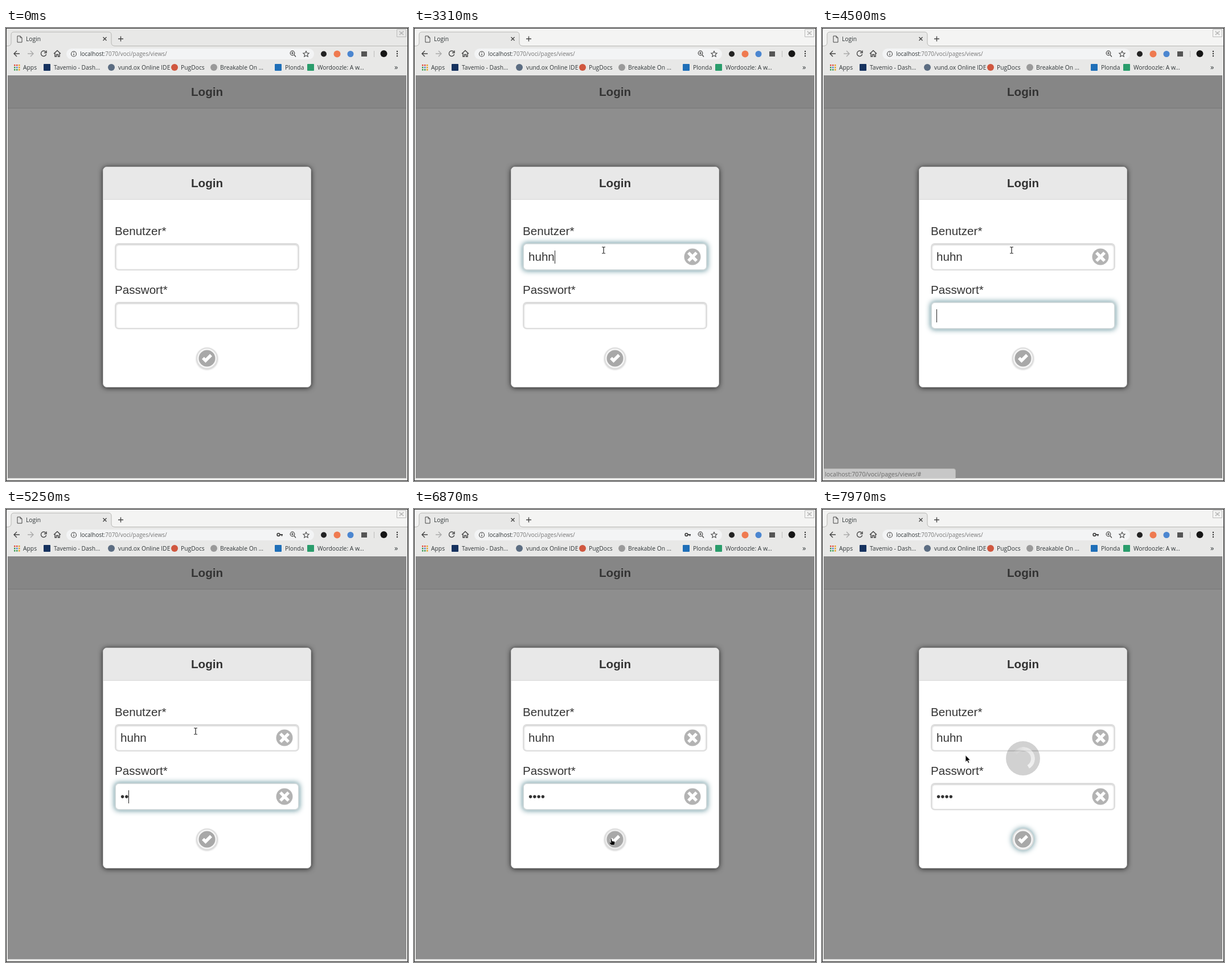
An HTML page that plays this animation: 706 by 794 pixels, repeating every 8 s.

```html
<!DOCTYPE html>
<html lang="de">
<head>
<meta charset="utf-8">
<title>Login</title>
<style>
html, body { margin: 0; width: 100%; height: 100%; overflow: hidden; background: #2b2b2b; }
body * { position: absolute; box-sizing: border-box; }
svg { left: 0; top: 0; overflow: visible; }
.ui { font: 10.3px "Open Sans", "Noto Sans", sans-serif; fill: #2e3436; }
.line { fill: none; stroke: #444; stroke-width: 1.4; }
#page, #page * { font: 20.6px/24px "Liberation Sans", Arial, sans-serif; color: #333; white-space: pre; }
#page h1 { margin: 0; width: 100%; text-align: center; font-weight: bold; }
#top { left: 3px; top: 83px; width: 700px; height: 58px; background: #868686; border-bottom: 1px solid #777; }
#dialog { left: 170px; top: 243px; width: 366px; height: 387px; background: #fff; border: 1px solid #ccc;
  border-radius: 7px; box-shadow: 0 1px 10px rgba(0,0,0,.75); }
#bar { left: 0; top: 0; width: 364px; height: 57px; background: #e8e8e8; border-bottom: 1px solid #d6d6d6; border-radius: 6px 6px 0 0; }
.field { left: 191px; width: 324px; height: 48px; background: #fff; border: 2px solid #ddd; border-radius: 7px;
  box-shadow: inset 0 1px 3px rgba(0,0,0,.25); }
.field span { left: 8px; top: 10px; }
.caret { top: 11px; width: 1px; height: 23px; background: #222; }
.btn { width: 38px; height: 38px; border-radius: 50%; border: 2px solid transparent; }
.btn svg { left: -2px; top: -2px; }
.clear { left: 469.5px; }
#ok { left: 334px; top: 559.5px; background: #f6f6f6; border-color: #ddd; box-shadow: 0 1px 3px rgba(0,0,0,.2); }
#ok.hover { background: #ededed; }
.clear.focus { background: #fff; border-color: #d4dcdd; }
.field.focus, .btn.focus, #ok.focus { box-shadow: 0 0 10px 1px #709ba4; }
.field.focus { border-color: #ccd6d8; }
#loader { left: 323px; top: 407px; width: 60px; height: 60px; border-radius: 50%; background: rgba(0,0,0,.18); }
#ring { left: 9.5px; top: 9.5px; width: 41px; height: 41px; border-radius: 50%;
  background: conic-gradient(transparent 40%, rgba(255,255,255,.45) 60%, rgba(255,255,255,.7) 99%, transparent);
  -webkit-mask: radial-gradient(circle, transparent 13px, #000 14px); mask: radial-gradient(circle, transparent 13px, #000 14px); }
</style>
</head>
<body>
<svg width="706" height="794" class="ui">
  <rect x="1" y="1" width="704" height="792" fill="#e8e8e7"/>
  <rect id="strip" x="1" y="1" width="704" height="31"/>
  <path d="M1 32H3Q9 31 9 26V12Q9 7 14 7H180Q185 7 185 12V26Q185 31 191 31.5H705V84H1Z" fill="#e8e8e7"/>
  <path d="M1 31.5H3Q9 31 9 26V12Q9 7 14 7H180Q185 7 185 12V26Q185 31 191 31.5H705" fill="none" stroke="#b6b6b3"/>
  <path d="M686.500 2.500h16v13h-16z" fill="none" stroke="#bbb"/>
  <path d="M691 6l7 6M698 6l-7 6" stroke="#aaa" stroke-width="2" stroke-dasharray="1.500 1"/>
  <g class="line">
    <path d="M20 14h5l3 3v8h-8zM25 14v3h3" stroke-width="1"/>
    <path d="M170.500 16l6 6m0-6l-6 6M197 19h9m-4.500-4.500v9"/>
    <path d="M24 45H14m5-5l-5 5 5 5"/>
    <path d="M38 45h10m-5-5l5 5-5 5" stroke="#aaa"/>
    <path d="M70 42a4.700 4.700 0 1 0 .7 4M71 39.500v4h-4"/>
    <path d="M84 45l6-5.500 6 5.500M86 44v6h2.500v-3.500h3v3.500h2.500v-6"/>
  </g>
  <rect x="106" y="36" width="435" height="19" rx="9.500" fill="#f3f4f5"/>
  <g class="line" stroke-width="1">
    <circle cx="119" cy="45.500" r="4.500" stroke-width="1.100"/>
    <path d="M119 45v3m0-5.500v1.300" stroke-width="1.200"/>
    <circle cx="503" cy="44" r="3.800" stroke-width="1.200"/>
    <path d="M506 47l3 3.500M501 44h4m-2-2v4" stroke-width="1.200"/>
    <path d="M527 40.500l1.500 3.300 3.600.4-2.700 2.400.8 3.600-3.200-1.900-3.200 1.900.8-3.600-2.700-2.400 3.600-.4z" stroke-width="1.100"/>
    <path d="M646.500 40v11" stroke="#bbb" stroke-width="1"/>
  </g>
  <g id="key" fill="none" stroke="#444" stroke-width="1.800">
    <circle cx="478.500" cy="45" r="2.300"/><path d="M481 45h5m-1.500 0v2.500"/>
  </g>
  <text x="35" y="22.500">Login</text>
  <text x="130" y="49" font-size="10" style="font-size:9.950px">localhost<tspan fill="#777">:7070/voci/pages/views/</tspan></text>
  <g fill="#333"><circle cx="687" cy="41" r="1.200"/><circle cx="687" cy="45" r="1.200"/><circle cx="687" cy="49" r="1.200"/></g>
  <circle cx="558" cy="45.500" r="5" fill="#222"/>
  <circle cx="581.500" cy="45.500" r="6" fill="#ef7a50"/>
  <circle cx="605" cy="45.500" r="5.500" fill="#4b86d0"/>
  <rect x="624" y="41" width="10" height="9" fill="#555"/>
  <circle cx="663.500" cy="45" r="6" fill="#151515"/>
  <g id="apps"></g>
  <g id="marks"></g>
  <text x="682" y="73" style="font-size:13px">»</text>
  <rect x="3" y="83" width="700" height="706" fill="#8e8e8e"/>
</svg>

<div id="page">
  <div id="top"><h1 style="top:17px">Login</h1></div>
  <div id="dialog"><div id="bar"><h1 style="top:16px">Login</h1></div></div>
  <span style="left:191px;top:344px">Benutzer*</span>
  <span style="left:191px;top:447px">Passwort*</span>
  <div class="field" style="top:377px"><span></span><i class="caret"></i></div>
  <div class="field" style="top:480px"><span></span><i class="caret"></i></div>
  <div class="btn clear" style="top:382px"></div>
  <div class="btn clear" style="top:485px"></div>
  <div class="btn" id="ok"></div>
  <div id="loader"><div id="ring"></div></div>
</div>

<svg width="706" height="794" class="ui">
  <g id="status">
    <path d="M3 772.500H231Q234.500 772.500 234.500 776V790H3Z" fill="#e8e8e7" stroke="#c4c4c2"/>
    <text x="5" y="786" fill="#555" style="font-size:10.600px">localhost:7070/voci/pages/views/#</text>
  </g>
  <g id="pointer">
    <path id="arrow" d="M0 0V12L2.800 9.500 4.800 14 6.800 13 4.900 8.800H8.500Z" fill="#000" stroke="#fff" stroke-width=".8"/>
    <path id="beam" d="M-3 -5.500H-1L0 -5 1 -5.500H3M0 -5V5M-3 5.500H-1L0 5 1 5.500H3" fill="none" stroke="#222" stroke-width="1.200"/>
    <path id="hand" d="M0 0Q1.200 -1 2 .5L3 4 6.500 4.600Q8 5 7.800 7L7 11H1.500L-1.800 7.500Q-2 6 -.5 6L1 7Z" fill="#000" stroke="#fff" stroke-width=".6"/>
  </g>
</svg>

<script>
const LOOP = 8000, BLINK = 530, EM = 20.6;
const $ = id => document.getElementById(id);
const all = sel => [...document.querySelectorAll(sel)];
const show = (el, on) => { el.style.visibility = on ? "visible" : "hidden"; };
const count = (times, t) => times.filter(s => s <= t).length;
const clamp = v => Math.max(0, Math.min(1, v));

// Bookmarks: icon x, shape, colour, label x, label
const marks = [
  [72, "square", "#16325f", 84, "Tavemio - Dash..."],
  [185, "circle", "#5c6d82", 197, "vund.ox Online IDE"],
  [296, "circle", "#d0573f", 307, "PugDocs"],
  [365, "circle", "#9a9a9a", 376, "Breakable On ..."],
  [478, "square", "#1f6fb8", 490, "Plonda"],
  [535, "square", "#2a9d6c", 547, "Wordoozle: A w..."]
];
$("marks").innerHTML = marks.map(([x, shape, color, tx, label]) =>
  `<rect x="${x - 6}" y="63" width="12" height="12" rx="${shape == "circle" ? 6 : 1}" fill="${color}"/>
   <text x="${tx}" y="73">${label}</text>`).join("") + '<text x="30" y="73">Apps</text>';

const dots = ["#e04a3a", "#e04a3a", "#e8a020", "#3a9a50", "#4a80d8", "#e8a020", "#3a9a50", "#3a9a50", "#e8a020"];
$("apps").innerHTML = dots.map((c, i) =>
  `<rect x="${14 + i % 3 * 4}" y="${64 + (i / 3 | 0) * 4}" width="2.5" height="2.5" fill="${c}"/>`).join("");

const fields = all(".field"), texts = all(".field span"), carets = all(".caret"), clears = all(".clear");
const icon = (fill, points) => `<svg width="38" height="38"><circle cx="19" cy="19" r="14.5" fill="${fill}"/>
  <polygon points="${points}" transform="translate(10 10) scale(1.29)" fill="#fff"/></svg>`;
for (const c of clears)
  c.innerHTML = icon("#b3b3b3", "14,3 11,0 7,4 3,0 0,3 4,7 0,11 3,14 7,10 11,14 14,11 10,7");
$("ok").innerHTML = icon("#a8a8a8", "14,4 11,1 5,7 3,5 0,8 5,13");

const user = "huhn";
const userKeys = [2830, 2950, 3220, 3310], passKeys = [5150, 5250, 5920, 6000];
const caretResets = [1820, ...userKeys, 4120, 5150, 5310, 5920, 6000];

// Pointer path: time, x, y
const path = [
  [950, 690, 557], [1080, 600, 490], [1220, 480, 420], [1350, 390, 388], [1480, 345, 380], [1640, 333, 389.5],
  [6220, 333, 389.5], [6400, 336, 430], [6580, 342, 520], [6720, 348, 586], [6850, 345, 578],
  [7070, 345, 578], [7300, 315, 560], [7600, 264, 500], [7870, 242, 456], [7970, 252, 431.5]
];

function pointerAt(t) {
  const i = Math.min(Math.max(count(path.map(p => p[0]), t), 1), path.length - 1);
  const [t0, x0, y0] = path[i - 1], [t1, x1, y1] = path[i];
  const k = clamp((t - t0) / (t1 - t0));
  return [x0 + (x1 - x0) * k, y0 + (y1 - y0) * k];
}

function drawPointer(t) {
  const [x, y] = pointerAt(t);
  const onButton = Math.hypot(x - 353, y - 578.5) < 19;
  const inField = x > 191 && x < 515 && (y > 377 && y < 425 || y > 480 && y < 528);
  const kind = onButton ? "hand" : inField ? "beam" : "arrow";
  for (const id of ["arrow", "beam", "hand"]) show($(id), t >= 950 && id == kind);
  $("pointer").setAttribute("transform", `translate(${x} ${y})`);
  $("ok").classList.toggle("hover", onButton);
}

function draw(t) {
  $("strip").setAttribute("fill", t < 1770 ? "#e8e8e7" : "#f4f4f3");
  const focus = ["", "user", "clear", "pass", "", "ok"][count([1820, 3720, 4120, 6950, 7020], t)];
  const typed = [count(userKeys, t), count(passKeys, t)];
  const lastReset = caretResets[count(caretResets, t) - 1];
  const caretOn = t < lastReset + BLINK || (t - lastReset) / BLINK % 2 < 1;
  const values = [user.slice(0, typed[0]), "•".repeat(typed[1])];
  const advance = [EM * .556, EM * .35];

  fields.forEach((field, i) => {
    const active = focus == ["user", "pass"][i];
    field.classList.toggle("focus", active);
    texts[i].textContent = values[i];
    carets[i].style.left = 8 + Math.round(typed[i] * advance[i]) + "px";
    show(carets[i], active && caretOn);
    show(clears[i], typed[i] > 0);
  });
  clears[0].classList.toggle("focus", focus == "clear");
  $("ok").classList.toggle("focus", focus == "ok");
  show($("key"), t >= 5150);

  $("status").style.opacity = clamp((t - 3720) / 220) * clamp((4680 - t) / 280);
  show($("loader"), t >= 7020);
  $("ring").style.transform = `rotate(${150 + (t - 7970) * .36}deg)`;
  drawPointer(t);
}

function tick(now) {
  draw(now % LOOP);
  requestAnimationFrame(tick);
}
draw(0);
requestAnimationFrame(tick);
</script>
</body>
</html>
```
